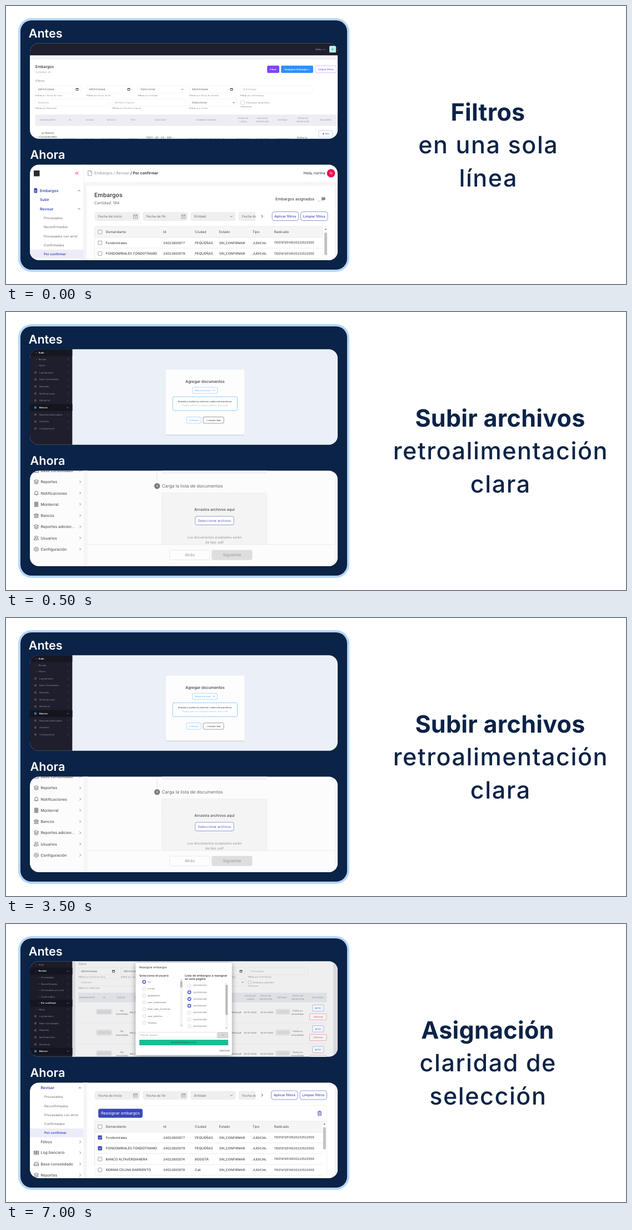
These frames come from a looping animation (1116x502 px, 8000 ms). An HTML page:

```html
<!DOCTYPE html>
<html lang="es">
<head>
<meta charset="utf-8">
<title>Antes y ahora</title>
<style>
html, body { margin: 0; width: 100%; height: 100%; overflow: hidden; background: #fff; }
svg { display: block; width: 100vw; height: 100vh; }
text { font-family: Inter, "Open Sans", sans-serif; text-rendering: geometricPrecision; white-space: pre; }
.scene { visibility: hidden; animation: 8s step-end infinite; }
#filters { animation-name: first; }
#upload { animation-name: second; }
#assign { animation-name: third; }
@keyframes first { 0% { visibility: visible } 6.25%, 100% { visibility: hidden } }
@keyframes second { 0% { visibility: hidden } 6.25% { visibility: visible } 68.75%, 100% { visibility: hidden } }
@keyframes third { 0% { visibility: hidden } 68.75%, 100% { visibility: visible } }
</style>
</head>
<body>
<svg id="stage" viewBox="0 0 1116 502">
  <defs>
    <clipPath id="top"><rect x="43" y="67.3" width="554" height="172.5" rx="16"/></clipPath>
    <clipPath id="bottom"><rect x="43" y="286.5" width="554" height="172.5" rx="16"/></clipPath>
    <filter id="shade" x="-20%" y="-20%" width="140%" height="140%">
      <feDropShadow dx="0" dy=".8" stdDeviation=".7" flood-opacity=".28"/>
    </filter>
    <filter id="glow" x="-20%" y="-20%" width="140%" height="140%">
      <feDropShadow dx="0" dy="2" stdDeviation="5" flood-opacity=".4"/>
    </filter>
    <filter id="smear"><feGaussianBlur stdDeviation="1.6"/></filter>
  </defs>
</svg>
<script>
const NAVY = '#0b2346', BLUE = '#3a49b6', INK = '#2c2c30', GRAY = '#6c6c70', LINE = '#e4e4e6';

// Text is placed by its vertical centre.
const text = (x, y, s, size, fill = INK, weight = 400, anchor = 'start', spacing = 0) =>
  `<text x="${x}" y="${y + size * .36}" font-size="${size}" fill="${fill}" font-weight="${weight}" text-anchor="${anchor}" letter-spacing="${spacing}">${s}</text>`;
const mid = (x, y, s, size, fill, weight, spacing) => text(x, y, s, size, fill, weight, 'middle', spacing);
const box = (x, y, w, h, fill, rx = 0, extra = '') =>
  `<rect x="${x}" y="${y}" width="${w}" height="${h}" rx="${rx}" fill="${fill}" ${extra}/>`;
const frame = (x, y, w, h, stroke, rx = 2, fill = 'none', sw = .7) =>
  box(x, y, w, h, fill, rx, `stroke="${stroke}" stroke-width="${sw}"`);
const dot = (x, y, r, fill, extra = '') => `<circle cx="${x}" cy="${y}" r="${r}" fill="${fill}" ${extra}/>`;
const path = (x, y, d, stroke = GRAY, sw = .9) =>
  `<path transform="translate(${x} ${y})" d="${d}" fill="none" stroke="${stroke}" stroke-width="${sw}" stroke-linejoin="round"/>`;
const hline = (x, y, w, c = LINE) => path(x, y, `M0 0h${w}`, c, .7);
const button = (x, y, w, h, s, size, fill, ink, edge = fill, rx = 2, weight = 500) =>
  frame(x, y, w, h, edge, rx, fill) + mid(x + w / 2, y + h / 2, s, size, ink, weight);
const each = (list, f) => list.map(f).join('');

const RIGHT = 'M-1.2 -2.4L1.2 0L-1.2 2.4', DOWN = 'M-2.2 -1.1L0 1.1L2.2 -1.1', UP = 'M-2 1L0 -1L2 1';
const ICONS = {
  layers: 'M0 -4L4 -2L0 0L-4 -2ZM-4 0L0 2L4 0M-4 2L0 4L4 2',
  bell: 'M-3.6 2.3C-2.4 1 -2.6 0 -2.6 -1A2.6 2.6 0 0 1 2.6 -1C2.6 0 2.4 1 3.6 2.3ZM-1 3.6h2',
  grid: 'M-3 -4h6v8h-6ZM-1 -4v8M1 -4v8M-3 -1.3h6M-3 1.3h6',
  bank: 'M-4 -1.5L0 -4L4 -1.5ZM-3 -1v4M-1 -1v4M1 -1v4M3 -1v4M-4 3.6h8',
  users: 'M-1.2 -3.6a1.6 1.6 0 1 0 .1 0M-4 3.5v-1.5q0 -1.6 2.8 -1.6t2.8 1.6v1.5ZM1.6 -3.4a1.5 1.5 0 0 1 0 3M2.6 .7q1.4 .4 1.4 1.6v1.2',
  gear: 'M0 -4L3.5 -2V2L0 4L-3.5 2V-2ZM0 -1.4a1.4 1.4 0 1 0 .1 0',
  table: 'M-4 -3h8v6h-8ZM0 -3v6M-4 -1h8M-4 1h8',
  drive: 'M-4 .5L-2.6 -3h5.2L4 .5V3.2H-4ZM-4 .6h8',
  calendar: 'M-3.5 -3h7v6.5h-7ZM-3.5 -1h7M-1.8 -4v1.8M1.8 -4v1.8M-1.4 1.2h2.8',
  page: 'M-3.3 -4.5h4.2L3.3 -2V4.5H-3.3ZM.9 -4.5V-2H3.3',
  trash: 'M-3.6 -2.6h7.2M-2.8 -2.6V4h5.6V-2.6M-1.3 -2.6V-4h2.6v1.4M-.9 -1v3.4M.9 -1v3.4'
};

const headline = (cx, lines) => each(lines, (s, i) =>
  mid(cx + (i ? .8 : 0), 191.4 + 59.5 * i, s, 43, NAVY, i ? 490 : 750, i ? 1.6 : .3));

const scene = (id, top, bottom, cx, lines) =>
  `<g class="scene" id="${id}"><g clip-path="url(#top)">${top}</g><g clip-path="url(#bottom)">${bottom}</g>${headline(cx, lines)}</g>`;

// Parts of the new design
const outlined = (x, y, w, s) => button(x, y, w, 16, s, 6.1, '#fff', BLUE, '#5f6cc8', 4);
function filterBar(y, bx) {
  const labels = ['Fecha de inicio', 'Fecha de fin', 'Entidad', 'Fecha de'];
  return each(labels, (s, i) => {
    const x = [159.5, 246, 332, 418.5][i], w = i < 3 ? 81.5 : 31.5;
    return box(x, y - 8, w, 16, '#efeff0', 4) + text(x + 6.5, y, s, 6, GRAY) +
      (i < 2 ? path(x + 73.5, y, ICONS.calendar, '#858588', .7) : i < 3 ? path(x + 73.5, y, DOWN) : '');
  }) + box(449.5, y - 9, 10, 18, '#fff') + path(461, y - .5, RIGHT, INK) +
    outlined(bx, y - 8.5, 47.5, 'Aplicar filtros') + outlined(bx + 51.5, y - 8.5, 48.5, 'Limpiar filtros');
}
const check = (y, on) => on
  ? box(165.5, y - 3.7, 7.4, 7.4, BLUE, 1) + path(169.2, y, 'M-2 0L-.5 1.6L2.2 -1.6', '#fff')
  : frame(165.8, y - 3.4, 6.8, 6.8, '#77777c', .8, '#fff');
const COLS = [179.5, 283, 340, 383.5, 443.7, 482.6];
const SIZES = [6, 5.8, 6, 5.8, 5.6, 5.5];
const PEOPLE = [
  ['Fondomirales', 77, 'PEQUEÑAS'], ['FONDOMIRALES FONDOTRAMO', 79, 'PEQUEÑAS'],
  ['BANCO ALTAVERDIANERA', 74, 'BOGOTÁ'], ['NORMA CELINA BARRIENTO', 78, 'Cali']
];
function table(y, count, checked) {
  const head = ['Demandante', 'Id', 'Ciudad', 'Estado', 'Tipo', 'Radicado'];
  return box(159.5, y - 10, 411, 20, '#f5f5f6') + hline(159.5, y - 10, 418) + hline(159.5, y + 10, 411) +
    path(159.5, y - 10, 'M0 0V80', LINE, .7) + check(y, false) +
    each(head, (s, i) => text(COLS[i], y, s, 6.1, '#4a4a4e')) +
    each(PEOPLE.slice(0, count), ([name, id, city], n) => {
      const cy = y + 19.5 * (n + 1);
      const cells = [name, '240228000' + id, city, 'SIN_CONFIRMAR', 'JUDICIAL', '11001412514520232522500'];
      return check(cy, n < checked) + each(cells, (s, i) => text(COLS[i], cy, s, SIZES[i])) + hline(159.5, cy + 9.7, 411);
    });
}
const scrollbar = (x, y, h) =>
  path(x, y, 'M-1.2 .6L0 -.8L1.2 .6Z', '#555') + box(x - 2.5, y + 6, 5, h, '#c2c2c4', 2.5);
const sideItem = (y, s, icon) =>
  (icon ? path(54.5, y, ICONS[icon], '#55555a', .8) : '') + text(62.5, y, s, 6.9, '#55555a', 500) + path(133.5, y, RIGHT, GRAY, .8);
const subMenu = (y, x) => box(43, y + 57, 96.5, 16, '#ececf8') +
  each(['Procesados', 'Reconfirmados', 'Procesados con error', 'Confirmados', 'Por confirmar'], (s, i) =>
    text(x, y + 16.2 * i, s, 6, i < 4 ? GRAY : BLUE, i < 4 ? 400 : 600));

// Parts of the old design
const HEADS = [[75, 'DEMANDANTE'], [115.5, 'ID'], [151, 'CIUDAD'], [189.5, 'ESTADO'], [228.5, 'TIPO'], [278.5, 'RADICADO'],
  [361, 'NOMBRE ORIGINAL'], [427, 'FECHA DE|CARGA'], [461.5, 'FECHA DE|RECEPCIÓN'], [498, 'ENTIDAD'], [534.5, 'FECHA DE|RECEPCIÓN'], [575.5, 'ACCIONES']];
const oldHeads = (list, y, fill) => each(list, ([x, s]) => {
  const parts = s.split('|');
  return each(parts, (p, i) => mid(x, y + (parts.length > 1 ? i * 5.6 - 2.8 : 0), p, 3.6, fill, 600, .2));
});
const oldField = (x, y, w, s, hint, kind, edge) => frame(x, y - 6.5, w, 13, edge, 1) +
  text(x + 4.5, y, s, kind ? 4.9 : 4.5, kind ? '#666' : '#a9a9b0') +
  (kind === 'date' ? path(x + w - 7, y, 'M-2 -1.7h4v3.7h-4ZM-2 -1h4', '#333', .8) : kind ? path(x + w - 6, y, 'M-1.5 -.8L0 .8L1.5 -.8', '#444', .8) : '') +
  text(x, y + 10.7, '<tspan font-weight="600">Filtrar</tspan> ' + hint, 4.1, '#98989e');
const darkItem = (y, s, on, x = 60) => (on ? box(43, y - 6.3, 76.5, 12.6, '#151520') : '') +
  (x === 60 ? box(51, y - 2, 3.8, 4, on ? '#2f7fb5' : '#4a4a5c', .8) : dot(x - 4, y, .6, '#77778a')) +
  text(x, y, s, 4.1, on ? '#fff' : '#8e8e9d', on ? 600 : 400) +
  path(111, y, on ? 'M-1.3 -.6L0 .7L1.3 -.6' : 'M-.6 -1.2L.6 0L-.6 1.2', on ? '#ccc' : '#666676', .6);

function oldFilters() {
  const edge = '#f1f1f4';
  const cut = [[115, '240228000'], [150, 'Bogotá'], [188, 'SIN_CONFIRMAR'], [229, 'JUDICIAL'], [361, '110-2023-0060-2023-3546.pdf'],
    [427, '25-01-2024'], [462, '25-01-2024'], [498, 'MONTERRAL']];
  return box(43, 67, 554, 173, '#fff') + box(43, 67, 554, 22.3, '#1f1f2d') + box(43, 89.3, 554, 8, '#f4f3f9') +
    text(557, 78, 'Hola, <tspan fill="#77778a">ivo</tspan>', 4.6, '#b4b4c0') +
    box(582, 72, 12, 12, '#b4f0ec', 1.5) + dot(588, 78, 1.7, '#5fc4bd') +
    text(53, 109.5, 'Embargos', 6.9, INK, 500) + text(53, 119, 'Cantidad: 36', 4.6, '#a5a5ac') +
    button(470.5, 108, 21, 12.5, 'Filtrar', 4.1, '#7b45f5', '#fff', '#7b45f5', 1.5, 600) +
    button(495.5, 108, 57, 12.5, 'Reasignar Embargos +', 4.2, '#2f8ef9', '#fff', '#2f8ef9', 1.5, 600) +
    button(556.5, 108, 38, 12.5, 'Limpiar filtros', 4.3, '#fff', '#7b45f5', '#c4adfa', 1.5) +
    text(53, 135, 'Filtros', 5.6, '#88888e') +
    oldField(53, 150.5, 82, 'dd/mm/aaaa', 'por fecha de inicio', 'date', edge) +
    oldField(145, 150.5, 83, 'dd/mm/aaaa', 'por fecha de fin', 'date', edge) +
    oldField(237.5, 150.5, 86, 'Seleccionar', 'por Entidad', 'list', edge) +
    oldField(330, 150.5, 83, 'dd/mm/aaaa', 'por fecha de medida', 'date', edge) +
    oldField(422, 150.5, 130, 'Id Embargo', 'por Id Embargo', '', edge) +
    oldField(53, 174.3, 132, 'Radicado', 'por Radicado', '', edge) +
    oldField(191.5, 174.3, 132, 'Nombre original', 'por Nombre original', '', edge) +
    oldField(330, 174.3, 86, 'Seleccionar', 'por Correo', 'list', edge) +
    frame(422.5, 171, 6.7, 6.7, '#c8c8cd', 1) + text(432, 174.3, 'Embargos asignados', 4.3, '#98989e') +
    text(422, 182, 'Seleccione', 3.9, '#88888e') +
    box(53, 196, 544, 20.5, '#ededf3') + oldHeads(HEADS, 206, '#a2a2b0') +
    mid(75, 229.7, 'LETRADOS', 4.3, '#444') + mid(75, 236.7, 'COLEGIADORES', 4.3, '#444') +
    mid(277, 237, '11001 - 40 - 03 - 060 -', 4.6, '#444') + mid(533, 237, 'Fecha no', 4.3, '#444') +
    each(cut, ([x, s]) => mid(x, 240.7, s, 4.3, '#555')) +
    button(563, 224.5, 25, 12.5, '◉ Ver', 4.4, '#fff', '#4a6fd0', '#a9c0ee', 1.5);
}

function newFilters() {
  return box(43, 286, 554, 174, '#fff') + box(139.5, 318, 458, 142, '#f5f5f6') + box(139.5, 286, .8, 174, '#f0f0f2') +
    box(145.5, 324.5, 446.5, 136, '#fff') + box(50, 297, 10.5, 10.5, '#2b2b2e') +
    path(127.5, 302, 'M-.3 -2.4L-2.6 0L-.3 2.4M2.6 -2.4L.3 0L2.6 2.4', '#ee1a58', 1) +
    path(151, 301.7, ICONS.page, '#8c8c90', .8) +
    text(159, 302, 'Embargos / Revisar <tspan fill="#2c2c30" font-weight="600">/ Por confirmar</tspan>', 6.9, '#909094') +
    text(574.5, 302, 'Hola, norma', 6.8, INK, 400, 'end') + dot(585, 302, 7.4, '#ee0f55') + mid(585, 302, 'N', 6.2, '#fff') +
    box(50.5, 329, 5.7, 8.6, BLUE, 1) + path(53.3, 334, 'M-1.5 -.8h3M-1.5 1h3', '#fff', .7) +
    text(61, 333.5, 'Embargos', 6.9, BLUE, 600) + path(131.5, 333.5, UP, BLUE) +
    text(61, 350, 'Subir', 6.7, BLUE, 600) + text(61, 366.3, 'Revisar', 6.8, BLUE, 600) + path(131.5, 366.3, UP, BLUE) +
    subMenu(383, 68) +
    text(159, 341, 'Embargos', 10.5, INK, 500) + text(159, 355, 'Cantidad: 184', 7, GRAY) +
    text(485, 348, 'Embargos asignados', 7.1) + box(562, 345.3, 13, 5.4, '#8c8c8f', 2.7) + dot(564.3, 348, 4, '#fff', 'filter="url(#shade)"') +
    filterBar(380, 479) + table(408, 2, 0) + scrollbar(575.5, 403, 41);
}

function oldUpload() {
  const menu = ['Log bancario', 'Base Consolidado', 'Reportes', 'Notificaciones', 'Monterral', 'Bancos', 'Reportes Adicionales', 'Usuarios', 'Configuración'];
  return box(43, 67, 554, 173, '#ebeff7') + box(43, 67, 76.3, 173, '#1e1e2c') + box(43, 67, 76.3, 12.5, '#171722') +
    text(58.5, 73.7, 'Subir', 4.1, '#fff', 600) + dot(54.5, 73.7, .6, '#aaa') +
    darkItem(85.3, 'Revisar', false, 58.5) + darkItem(97, 'Filtros', false, 58.5) +
    each(menu, (s, i) => darkItem(109.2 + 12.66 * i, s, i === 5)) +
    box(288, 104, 141, 117.5, '#fdfdfe', 1, 'filter="url(#shade)"') + mid(358.3, 125.7, 'Agregar documentos', 7, '#38383e', 500) +
    frame(335.5, 136, 45, 11, '#94c9f7') + text(339.5, 141.5, 'Selecciona Lista', 3.7, '#62a9ea') + path(374.5, 141.5, 'M-1.6 -.8L0 .8L1.6 -.8', '#3f95e6', .8) +
    box(300, 153, 116.5, 25, '#fbfdff', 2, 'stroke="#5babee" stroke-width="1" stroke-dasharray="2 1.3"') +
    mid(358.3, 162, 'Arrastra y suelta los archivos o selecciona archivos.', 3.95, '#505056', 500) +
    mid(358.3, 169.2, 'Puedes subir uno o múltiples archivos, de tipo: pdf', 3.4, '#b5b5bc') +
    button(325, 189.5, 26, 11.5, '➤ Enviar', 3.9, '#fff', '#62a9ea', '#94c9f7') +
    button(355, 189.5, 37, 11.5, '▯ Limpiar lista', 3.9, '#fff', '#4c4c52', '#77777d');
}

function newUpload() {
  const menu = [['Reportes', 'layers'], ['Notificaciones', 'bell'], ['Monterral', 'grid'], ['Bancos', 'bank'],
    ['Reportes adicion...', 'layers'], ['Usuarios', 'users'], ['Configuración', 'gear']];
  return box(43, 286, 554, 174, '#fcfcfc') + box(139.5, 286, 7.5, 174, '#f6f6f6') + box(591, 286, 6, 174, '#f7f7f7') +
    sideItem(286.3, 'Base consolidado', 'drive') + each(menu, ([s, icon], i) => sideItem(306.8 + 20.25 * i, s, icon)) +
    path(272, 286, 'M0 0V21', '#dedee0', .8) + frame(280.5, 270, 189.5, 21.5, '#e9e9ea', 3, '#f4f4f4') +
    dot(272, 314.3, 5.2, '#7c7c7f') + mid(272, 314.3, '4', 5.5, '#fff') + text(280.5, 314.3, 'Carga la lista de documentos', 8, '#6a6a6e') +
    box(280.5, 326.5, 189.5, 110, '#f4f4f4', 3, 'stroke="#e6e6e8" stroke-width=".7" stroke-dasharray="2 1.5"') +
    mid(375.3, 356.5, 'Arrastra archivos aquí', 6.8, '#606064', 600) +
    button(340.5, 369, 69.5, 15.5, 'Seleccionar archivos', 6.1, '#fff', '#5260bd', '#6774c8', 3, 400) +
    mid(375.3, 407.2, 'Los documentos aceptados serán', 6.1, '#959599') + mid(375.3, 416, 'de tipo .pdf', 6.1, '#959599') +
    box(147, 420, 444, 40, '#fcfcfc') + hline(147, 420, 444) +
    button(294.5, 430, 72.5, 17.5, 'Atrás', 7.4, '#fdfdfd', '#98989c', '#dedee0', 2.5, 400) +
    button(370.5, 430, 72.5, 17.5, 'Siguiente', 7.5, '#dedede', '#98989c', '#dedede', 2.5, 400);
}

function oldAssign() {
  const sub = ['Procesados', 'Reconfirmados', 'Procesados con error', 'Confirmados', 'Por confirmar'];
  const menu = ['Log bancario', 'Base Consolidado', 'Reportes', 'Notificaciones', 'Monterral', 'Bancos'];
  const users = ['ivo', 'norma', 'MURGAS07', 'user_lumbrerasol', 'bank_user_monterral', 'user_vallerino', 'Teodora'];
  const heads = HEADS.map(([x, s], i) => [[146, 177, 207, 240, 270, 300, 360, 440, 468, 497, 525.5, 561.5][i], s]);
  const edge = '#e0e0e3', ink = '#66666c', pale = '#f3f3f5';
  const radio = (x, y, on) => on
    ? dot(x, y, 2.6, '#fff', 'stroke="#4a63d8" stroke-width="1.7"')
    : dot(x, y, 3, '#fff', 'stroke="#bcbcc2" stroke-width=".6"');
  const row = y => hline(130, y - 18, 447, '#e2e2e5') +
    box(163, y - 5, 27, 9, '#d2d2d5', 0, 'filter="url(#smear)"') + box(486, y - 5, 25, 9, '#d6d6d9', 0, 'filter="url(#smear)"') +
    mid(209, y - 2.7, 'No', 4.1, ink) + mid(209, y + 3.7, 'encontrado', 4.1, ink) + text(222.5, y + .5, 'SIN_CONFIRMAR', 4.1, ink) +
    text(423.5, y + .5, '0060-3546.pdf', 4.1, ink, 400, 'end') + text(428, y + .5, '25-01-2024', 4.1, ink) + text(458, y + .5, '25-01-2024', 4.1, ink) +
    mid(525, y - 2.7, 'Fecha no', 4.1, ink) + mid(525, y + 3.7, 'encontrado', 4.1, ink) +
    button(551.5, y - 13, 20.5, 11.5, '◉ Ver', 3.8, pale, '#4a72d2', '#8fade8', 1.2) +
    button(546.5, y + 3, 30.5, 11, '▯ Eliminar', 3.8, pale, '#e0505c', '#ee8e96', 1.2);
  return box(43, 67, 554, 173, '#efeff0') + box(119, 67, 6, 173, '#dcdce0') + box(589, 67, 8, 173, '#dadade') +
    text(130.5, 72.5, 'Filtros', 5, '#88888e') +
    oldField(130.5, 85.3, 70, 'dd/mm/aaaa', 'por fecha de inicio', 'date', edge) +
    oldField(207, 85.3, 70, 'dd/mm/aaaa', 'por fecha de fin', 'date', edge) +
    oldField(360, 85.3, 70, 'dd/mm/aaaa', 'por fecha de medida', 'date', edge) +
    oldField(435.5, 85.3, 108, 'Id Embargo', 'por Id Embargo', '', edge) +
    oldField(130.5, 105.3, 108, 'Radicado', 'por Radicado', '', edge) +
    oldField(360, 105.3, 72, 'Seleccionar', 'por Correo', 'list', edge) +
    frame(436, 102.5, 5.5, 5.5, '#b4b4ba', .8) + text(444, 105.3, 'Embargos asignados', 3.9, '#909096') + text(436, 112, 'Seleccione', 3.5, '#88888e') +
    box(130.5, 124, 447, 17, '#dfe0e6') + oldHeads(heads, 132.5, '#9898a2') +
    each([159, 196.5, 234], row) +
    box(43, 67, 76.3, 173, '#1c1c29') + darkItem(73.3, 'Subir', false, 58.5) + darkItem(85, 'Revisar', true, 58.5) +
    each(sub, (s, i) => darkItem(96.5 + 11.6 * i, s, i === 4, 63)) + darkItem(154.3, 'Filtros', false, 58.5) +
    each(menu, (s, i) => darkItem(166.6 + 12.65 * i, s, i === 5)) +
    box(233.5, 70, 173, 166.5, '#fff', 1, 'filter="url(#glow)"') +
    text(240, 78, 'Reasignar embargos', 5.1) + text(240, 93.2, 'Selecciona el usuario', 5.2, INK, 500) +
    text(322, 93.2, 'Lista de embargos a reasignar', 5.3, INK, 500) + text(322, 99.5, 'en esta página', 5.3, INK, 500) +
    each(users, (s, i) => radio(248.7, 104.6 + 12.3 * i, i === 0) + text(255, 104.6 + 12.3 * i, s, 4.1, ink)) +
    each(users, (s, i) => radio(330, 110.9 + 12.3 * i, i > 0 && i < 4) +
      text(337, 110.9 + 12.3 * i, '2401200000' + [0, 9, 8, 7, 6, 5, 3][i], 3.7, ink)) +
    box(313, 99, 5, 87, '#f3f3f4') + box(313.7, 103.5, 3.8, 11, '#b8b8bc') + path(315.6, 183, 'M-1 -.5L0 .6L1 -.5', '#555', .7) + path(315.6, 101, 'M-1 .5L0 -.6L1 .5', '#999', .7) +
    box(394.5, 106, 5, 84, '#f3f3f4') + box(395.2, 110, 3.8, 54, '#b8b8bc') + path(397, 188, 'M-1 -.5L0 .6L1 -.5', '#555', .7) +
    frame(240, 195.5, 139.5, 10.5, '#d9d9de', 1) + text(243, 200.7, 'Buscar usuario', 4.2, '#99999f') +
    button(381, 195.5, 18.5, 10.5, 'Ok', 3.8, '#d8d8dc', '#aaaab0', '#c4c4c9', 1) +
    box(240, 209, 160, 10, '#1bbd92', .8) + mid(320, 214, 'REASIGNAR EMBARGOS A IVO', 3.1, '#0a5a45', 500) +
    text(402.5, 229, 'CANCELAR', 3.5, INK, 400, 'end');
}

function newAssign() {
  return box(43, 286, 554, 174, '#fff') + box(139.5, 286, 6.5, 174, '#f5f5f6') + box(591.5, 286, 6, 174, '#f5f5f6') +
    text(173, 284, 'Cantidad:', 7, GRAY) + text(62.5, 296, 'Revisar', 6.8, BLUE, 600) + path(133, 296, UP, BLUE) +
    subMenu(312.2, 69) + sideItem(393.3, 'Filtros') + sideItem(413, 'Log bancario', 'table') +
    sideItem(433.3, 'Base consolidado', 'drive') + sideItem(453.5, 'Reportes', 'layers') +
    filterBar(309.5, 477.5) + frame(160, 328, 417.5, 150, '#ececee', 2) +
    button(166.5, 334, 79, 15.5, 'Reasignar embargos', 7.2, BLUE, '#fff', BLUE, 2.5, 400) +
    path(564.5, 341.8, ICONS.trash, BLUE, .9) + table(366, 4, 2) + scrollbar(573.3, 361, 40);
}

document.getElementById('stage').innerHTML +=
  box(22, 22, 596, 458, '#b3d6f8', 24) + box(26, 26, 588, 450, NAVY, 20) +
  text(40.7, 49.2, 'Antes', 21.6, '#fff', 640) + text(43.5, 268.3, 'Ahora', 21.6, '#fff', 640) +
  scene('filters', oldFilters(), newFilters(), 867.5, ['Filtros', 'en una sola', 'línea']) +
  scene('upload', oldUpload(), newUpload(), 889.5, ['Subir archivos', 'retroalimentación', 'clara']) +
  scene('assign', oldAssign(), newAssign(), 867, ['Asignación', 'claridad de', 'selección']);
</script>
</body>
</html>
```
